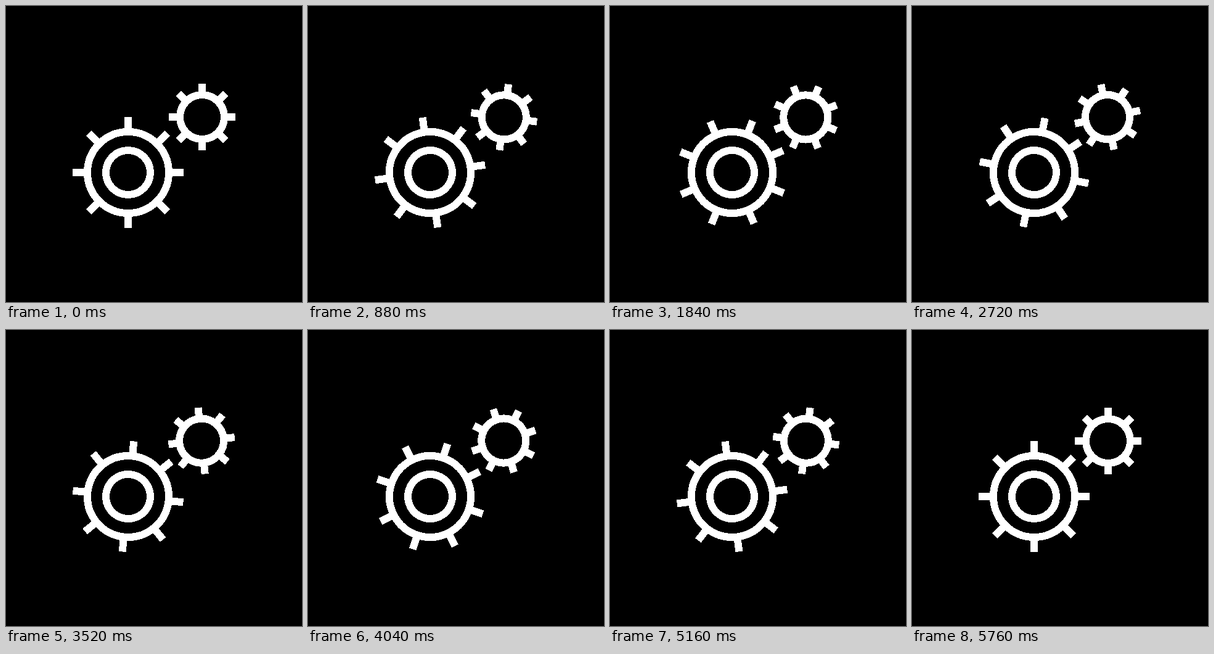
Write an HTML page that moves like this. It is 480 px wide and 480 px high and loops after 5800 ms.

```html
<!DOCTYPE html>
<html lang="en">
<head>
<meta charset="utf-8">
<title>Turning gears</title>
<style>
  html, body { margin: 0; width: 100%; height: 100%; overflow: hidden; background: #000; }
  svg { display: block; width: 100vw; height: 100vh; shape-rendering: crispEdges; }
  circle, line { fill: none; stroke: #fff; stroke-width: 12; }
</style>
</head>
<body>
<svg viewBox="0 0 480 480"></svg>
<script>
const LOOP = 5800;
const STEP = 40;
const TURN_START = 40;
const TURN_END = 5760;

const svg = document.querySelector('svg');

function add(parent, tag, attrs = {}) {
  const el = document.createElementNS('http://www.w3.org/2000/svg', tag);
  for (const name in attrs) el.setAttribute(name, attrs[name]);
  return parent.appendChild(el);
}

// x, y is the pivot; wobble is how far the gear's middle sits from it
function makeGear({ x, y, rim, reach, hub, direction, wobble = 0 }) {
  const group = add(svg, 'g');
  add(group, 'circle', { r: rim });
  if (hub) add(group, 'circle', { r: hub });
  for (let i = 0; i < 8; i++) {
    add(group, 'line', { y1: -rim, y2: -reach, transform: `rotate(${i * 45})` });
  }
  return angle => group.setAttribute('transform',
    `translate(${x} ${y}) rotate(${direction * angle}) translate(${wobble} 0)`);
}

const gears = [
  makeGear({ x: 198, y: 270, rim: 66, reach: 90, hub: 36, direction: -1 }),
  makeGear({ x: 317.5, y: 180, rim: 36, reach: 54, direction: 1, wobble: 0.5 })
];

function draw(time) {
  const now = Math.floor((time % LOOP) / STEP) * STEP;
  const part = (now - TURN_START) / (TURN_END - TURN_START);
  const angle = 360 * Math.min(1, Math.max(0, part));
  gears.forEach(turn => turn(angle));
}

const start = performance.now();
function tick() {
  draw(performance.now() - start);
  requestAnimationFrame(tick);
}
tick();
</script>
</body>
</html>
```
